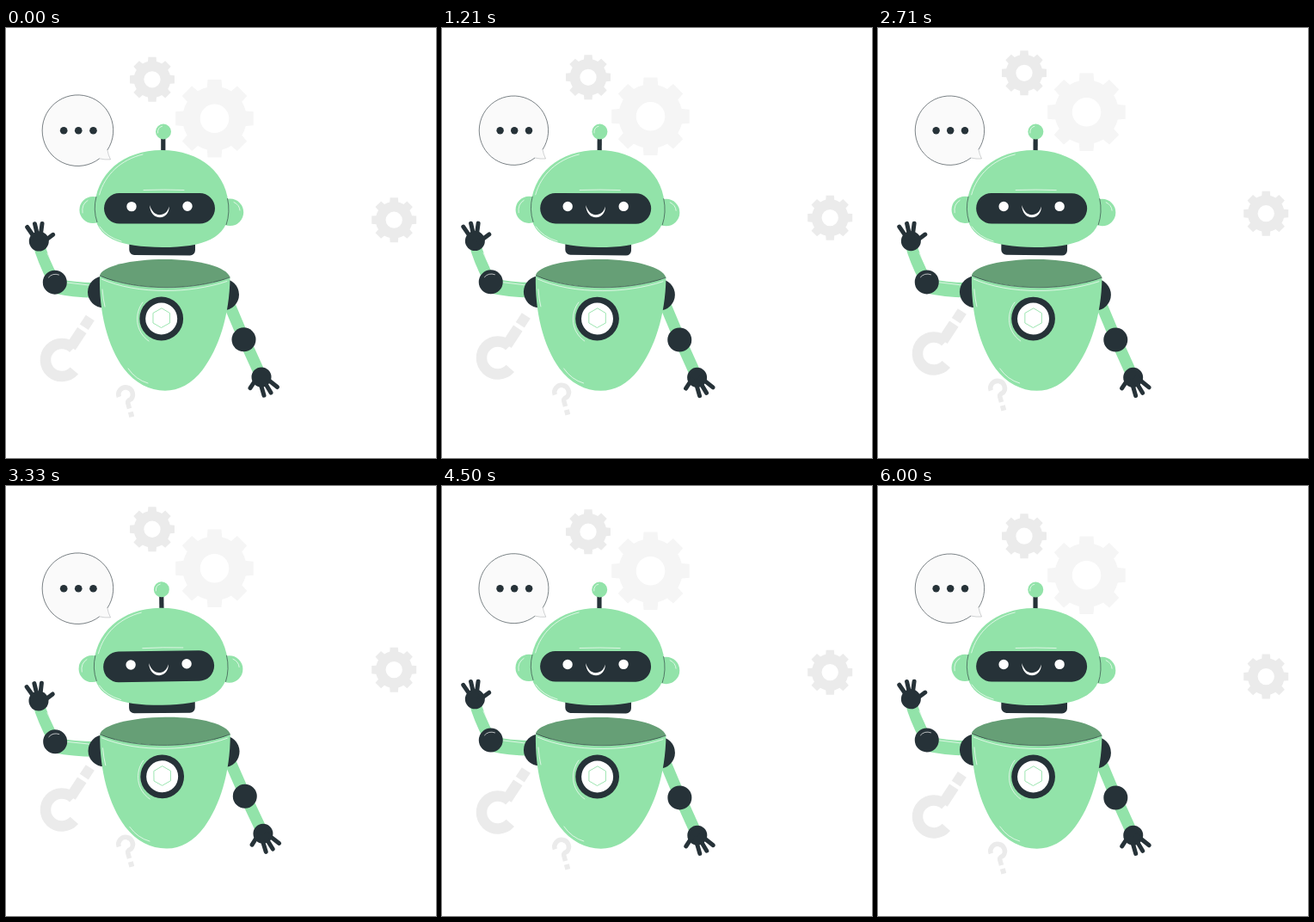
Write an HTML page that moves like this. It is 500 px wide and 500 px high and loops after 6040 ms.

```html
<!DOCTYPE html>
<html lang="en">
<head>
<meta charset="utf-8">
<title>Waving robot</title>
<style>
  html, body { margin: 0; width: 100%; height: 100%; overflow: hidden; background: #fff; }
  svg { display: block; width: 100%; height: 100%; }
  .line { fill: none; }
  .dark { fill: #263238; }
  .green { fill: #92e3a9; }
  .shine { fill: none; stroke: #fff; stroke-width: .8; stroke-opacity: .85; stroke-linecap: round; }
  .edge { fill: none; stroke: #263238; stroke-width: .6; }
  .limb { fill: none; stroke: #92e3a9; }
  .fingers { fill: none; stroke: #263238; stroke-width: 5; stroke-linecap: round; }
</style>
</head>
<body>
<svg viewBox="0 0 500 500">
  <g id="floaters">
    <g id="gears" fill-rule="evenodd"></g>
    <g class="line" stroke="#ebebeb">
      <path stroke-width="12.5" d="M88.3 351.5 L75.5 371 M78.4 372.6 A19 19 0 1 0 79.3 398.5"/>
      <path stroke-width="12" d="M97.8 337 L90.8 347.7"/>
      <path stroke-width="5.5" d="M131.3 429 A8.3 8.3 0 1 1 145.5 431.5 Q141 433.5 141.7 436 L143.5 442.5"/>
      <path stroke-width="6" d="M144.8 446.5 L146.3 452.3"/>
    </g>
  </g>

  <g id="bubble">
    <path fill="#fafafa" d="M108 151 A40.2 40.2 0 1 1 117 141.3 Q118 147 120.5 152 Q114 152.5 108 151Z"/>
    <path class="edge" stroke-width=".7" d="M108 151 A40.2 40.2 0 1 1 117 141.3"/>
    <path class="edge" stroke-opacity=".35" d="M117 141.3 Q118 147 120.5 152 Q114 152.5 108 151"/>
    <g class="dark">
      <circle cx="67.6" cy="119.2" r="4.2"/>
      <circle cx="84.2" cy="119.2" r="4.2"/>
      <circle cx="101" cy="119.2" r="4.2"/>
    </g>
  </g>

  <g id="robot">
    <!-- arms -->
    <path class="limb" stroke-width="17.5" d="M57 300 Q78 304.5 103 305"/>
    <path class="limb" stroke-width="13.5" d="M38 251 Q43 270 55 293 M257 315 L276 360 L296 404"/>
    <path class="shine" d="M48 262 L57 281 M71 296 L96 299"/>
    <g class="dark">
      <circle cx="113.5" cy="307" r="18.5"/>
      <circle cx="252.5" cy="310" r="18.5"/>
      <circle cx="56.8" cy="295.7" r="14"/>
      <circle cx="276.5" cy="362.3" r="14"/>
      <circle cx="38.3" cy="248" r="11.5"/>
      <circle cx="297" cy="406" r="11.5"/>
    </g>
    <path class="fingers" d="M34 245 L24.7 231.5 M37 243 L33.5 227.7 M40 243 L42 227.5 M43 249 L54.7 240.3"/>
    <path class="fingers" d="M291 408 L284 418.7 M295 410 L300 427.2 M299 409 L308 424 M301 406 L315.5 417.5"/>
    <path class="shine" d="M49.5 290 Q54 284.5 61.5 287"/>

    <!-- body -->
    <path fill="#669f76" d="M109 288 C111 277 145 269 185 269 C225 269 257 278 260.5 290 C235 299 208 301.7 187 301.7 C157 301.7 130 297 109 288Z"/>
    <path class="green" d="M109 288 C130 297 157 301.7 187 301.7 C208 301.7 235 299 260.5 290 C260 335 247 373 229 397 C216 414 201 421.7 185 421.7 C167 421.7 150 413 137 396 C118 370 108 330 109 288Z"/>
    <path class="edge" d="M109 288 C130 297 157 301.7 187 301.7 C208 301.7 235 299 260.5 290"/>
    <path class="shine" d="M111 292 C132 301 157 305.5 187 305.5 C208 305.5 235 302 257 294.5 M112 304 Q113 316 115 324 M142 396 Q151 409 165 413 M159 319 C149 332 150 353 166 364"/>
    <circle class="dark" cx="180.7" cy="338" r="25.4"/>
    <circle fill="#fff" cx="180.7" cy="338" r="18.5"/>
    <path class="line" stroke="#92e3a9" stroke-width=".9" d="M181 325.8 L190.5 331.5 L190.5 343 L180.5 348.5 L171 343 L171 331.5Z"/>

    <!-- head -->
    <rect class="dark" x="143.3" y="245" width="76.7" height="19.2" rx="6" transform="rotate(.5 181 255)"/>
    <path stroke="#263238" stroke-width="5.2" d="M182.8 126 V145"/>
    <circle class="green" cx="183" cy="120.5" r="9"/>
    <path class="shine" d="M176.5 122 Q176 115.5 181.5 114.2"/>
    <circle class="green" cx="101" cy="211.5" r="15.6"/>
    <circle class="green" cx="260.5" cy="214.3" r="15.7"/>
    <path class="shine" d="M89 215 Q87.5 205 95 200.5 M265 202.5 Q271.5 205.5 272 212"/>
    <path class="green" d="M103 212 C103 169 137 142 181 142 C226 142 259 169 259 211 C259 245 229 255 182 255 C133 254.5 103 245 103 212Z"/>
    <path class="edge" d="M105 196 Q101 211 106 226 M257.5 198 Q261 214 256 229"/>
    <path class="shine" d="M108.5 194 C115 170 134 153 159 147 M160 188.5 Q184 187.5 207 188.5 M109 231 Q117 243 134 248"/>
    <rect class="dark" x="114" y="192" width="129" height="35.6" rx="17.8"/>
    <g fill="#fff">
      <circle cx="146" cy="207.6" r="5.7"/>
      <circle cx="211" cy="207.3" r="5.7"/>
      <path d="M167 206 C167.5 215 172.5 220.3 179 220.3 C185.5 220 190 214.5 189.7 207.5 C188 214 184 217.2 178.5 217.2 C173 217 169.5 213 167 206Z"/>
    </g>
  </g>
</svg>
<script>
const LOOP = 6040, BEAT = LOOP / 4;
const $ = id => document.getElementById(id);
const clamp = (v, lo, hi) => Math.min(hi, Math.max(lo, v));

function gear(cx, cy, r, color) {
  const at = (rad, deg) => {
    const a = deg * Math.PI / 180;
    return `${(cx + rad * Math.cos(a)).toFixed(2)} ${(cy + rad * Math.sin(a)).toFixed(2)}`;
  };
  const body = r * .81, hole = r * .365;
  let d = '';
  for (let a = 0; a < 360; a += 45) {
    d += `${a ? 'L' : 'M'}${at(body, a - 13.5)} L${at(r, a - 10)} L${at(r, a + 10)} L${at(body, a + 13.5)} `;
    d += `A${body} ${body} 0 0 1 ${at(body, a + 31.5)} `;
  }
  d += `Z M${cx - hole} ${cy} a${hole} ${hole} 0 1 0 ${2 * hole} 0 a${hole} ${hole} 0 1 0 ${-2 * hole} 0Z`;
  return `<path fill="${color}" d="${d}"/>`;
}

$('gears').innerHTML = gear(242.5, 105.3, 46, '#f5f5f5')
  + gear(170, 59.8, 26.4, '#ebebeb') + gear(451.2, 223.2, 26.4, '#ebebeb');

// One pulse: rises from start to peak, falls until end.
const pulse = (t, start, peak, end) =>
  clamp(Math.min((t - start) / (peak - start), (end - t) / (end - peak)), 0, 1);

// Triangle wave: 1 at t = 0, -1 half a period later.
const triangle = (t, period) => Math.abs(((t % period + period) % period) / period * 4 - 2) - 1;

function draw(now) {
  const t = now % LOOP;
  const lift = 5 - 5 * triangle(Math.max(t - 445, 0), LOOP);
  $('floaters').setAttribute('transform', `translate(0 ${-lift})`);

  const p = (t + 40) % BEAT;
  const scale = 1 + .1 * pulse(p, 0, 151, 425) + .088 * pulse(p, 695, 845, 1120);
  $('bubble').setAttribute('transform', `translate(83.4 119.3) scale(${scale}) translate(-83.4 -119.3)`);

  const tilt = triangle(t + 180, BEAT) - .52;
  $('robot').setAttribute('transform', `rotate(${tilt} 170 271)`);
}

const begin = performance.now();
function tick() {
  draw(performance.now() - begin);
  requestAnimationFrame(tick);
}
tick();
</script>
</body>
</html>
```
